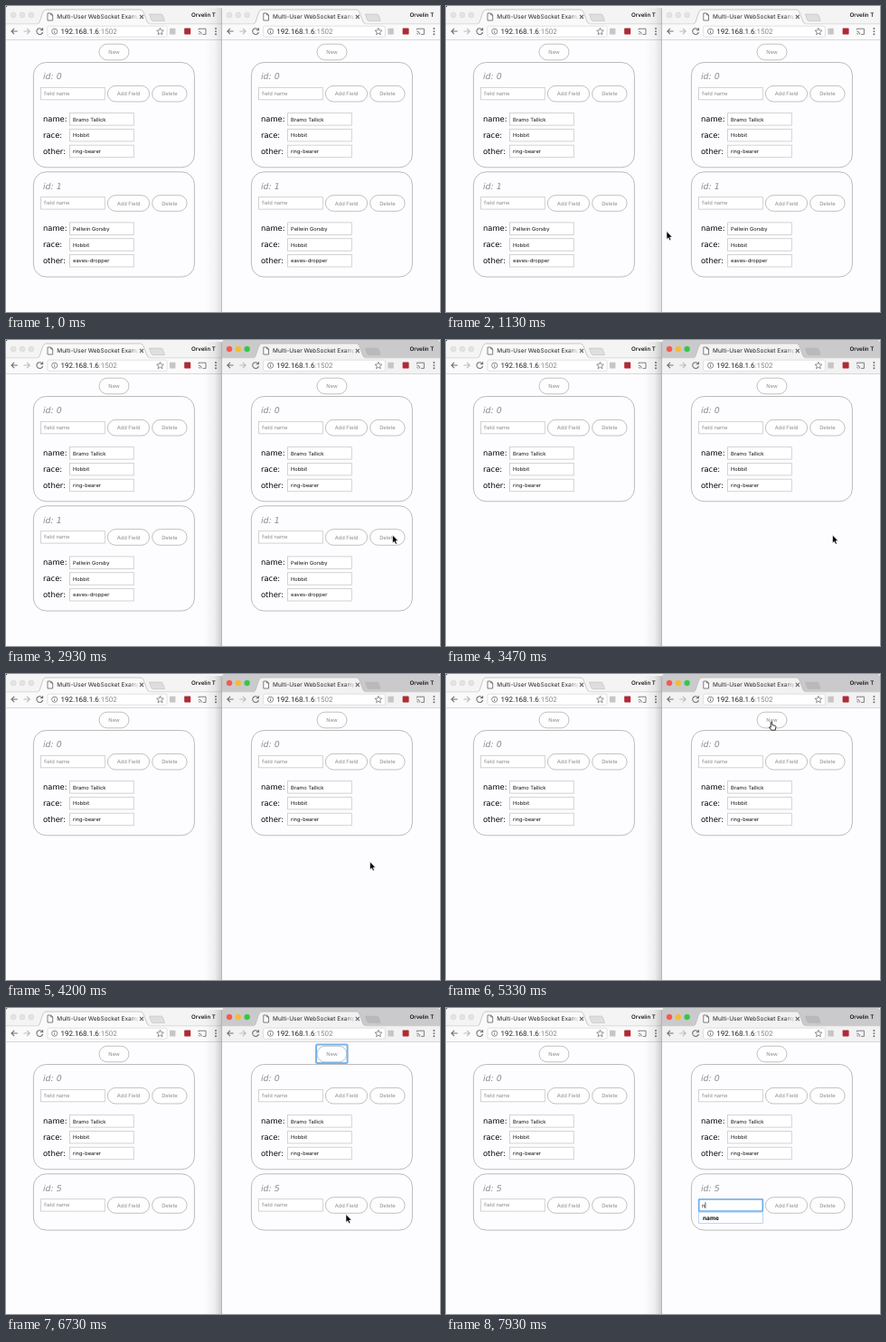
Recreate the animation shown at these times as an HTML page. Size 480 by 339 pixels, loop 8 s.

```html
<!DOCTYPE html>
<html lang="en">
<head>
<meta charset="utf-8">
<title>Shared records</title>
<style>
  html, body { margin: 0; width: 100%; height: 100%; overflow: hidden; background: #fdfcfe; }
  svg { display: block; width: 100vw; height: 100vh; }
  text { font-family: Inter, Roboto, sans-serif; font-size: 5.75px; white-space: pre; text-rendering: geometricPrecision; }
  .verdana { font-family: "DejaVu Sans", sans-serif; font-size: 8.4px; fill: #000; }
  .id { font-size: 9.4px; font-style: italic; fill: #8c8c8c; }
  .url { font-family: Roboto, Inter, sans-serif; font-size: 8px; fill: #222; }
  .dim { fill: #8c8c8c; }
  .button { fill: #fefefe; stroke: #acacac; stroke-width: .75; }
  .input { fill: #fff; stroke: #cecece; stroke-width: .9; }
  .card { fill: none; stroke: #a6a6a6; stroke-width: .75; }
  .icon { fill: none; stroke: #707070; stroke-width: 1.1; }
  .ring { fill: none; stroke: #78b4ea; stroke-width: 2; }
</style>
</head>
<body>
<svg id="stage" viewBox="0 0 480 339" preserveAspectRatio="none"></svg>
<script>
const LOOP = 8000, FPS = 15, CARD_STEP = 121.3;
const stage = document.getElementById('stage');

const rect = (x, y, w, h, rx, attrs) =>
  `<rect x="${x}" y="${y}" width="${w}" height="${h}" rx="${rx}" ${attrs}/>`;
const text = (x, y, str, attrs = '') => `<text x="${x}" y="${y}" ${attrs}>${str}</text>`;
const path = (d, attrs) => `<path d="${d}" ${attrs}/>`;
const circle = (x, y, r, attrs) => `<circle cx="${x}" cy="${y}" r="${r}" ${attrs}/>`;
const shift = (x, y, body, attrs = '') => `<g transform="translate(${x} ${y})" ${attrs}>${body}</g>`;
const button = (x, y, w, label) =>
  rect(x, y, w, 17.6, 8.8, 'class="button"') +
  text(x + w / 2, y + 11, label, 'class="dim" text-anchor="middle"');

function star(cx, cy, r) {
  const pts = Array.from({ length: 10 }, (_, i) => {
    const a = i * Math.PI / 5, q = i % 2 ? r * .45 : r;
    return (cx + q * Math.sin(a)).toFixed(2) + ',' + (cy - q * Math.cos(a)).toFixed(2);
  });
  return `<polygon points="${pts.join(' ')}" fill="none" stroke="#777" stroke-width=".8"/>`;
}

function card(key, slot, id, values) {
  const labels = ['name:', 'race:', 'other:'];
  const rows = values.map((v, i) => {
    const y = 118.6 + i * 17.8;
    return text(41, y + 9.4, labels[i], 'class="verdana"') +
      rect(70.5, y, 70.8, 13.5, 0, 'class="input"') +
      text(74, y + 9, v, 'fill="#111"');
  }).join('');
  return shift(0, slot * CARD_STEP,
    rect(30.4, 62.5, 178, values.length ? 116.3 : 62.3, 14, 'class="card"') +
    text(41, 81.3, 'id: ' + id, 'class="verdana id"') +
    rect(38.5, 90.4, 70.8, 13.4, 0, 'class="input"') +
    text(42, 99.2, 'field name', 'class="dim"') +
    button(112.4, 88.4, 46.2, 'Add Field') +
    button(161.7, 88.4, 38.4, 'Delete') + rows, `data-key="${key}"`);
}

// Window frame; extra widens the address bar and moves what follows it
function chrome(extra) {
  const w = 238.6 + extra;
  return rect(0, 0, w, 24, 3, 'class="bar"') +
    path('M35 20C39 19 39 4.5 44 4H149C154 4.5 154 19 159 20', 'class="tab" stroke="#b4b4b4" stroke-width=".7"') +
    rect(0, 19.8, w, 17.7, 0, 'class="tool"') +
    path(`M0 19.8H35M159 19.8H${w}`, 'stroke="#c4c4c4" stroke-width=".6"') +
    path(`M0 37.5H${w}`, 'stroke="#cacaca" stroke-width=".7"') +
    [8.2, 18, 27.8].map(x => circle(x, 10, 3, 'class="light" stroke-width=".5"')).join('') +
    path('M46 8H49.7L51.7 10V16H46ZM49.7 8V10H51.7', 'fill="#fff" stroke="#555" stroke-width=".75"') +
    text(56.3, 14, 'Multi-User WebSocket Exampl', 'style="font-size:6.5px" fill="url(#fade)"') +
    path('M148 10L152 14M152 10L148 14', 'class="icon"') +
    path('M158.5 9H171.5Q173 9 173.5 10.5L175.5 16.5H163Q161.2 16.5 160.6 15Z', 'class="plus" stroke="#b4b4b4" stroke-width=".5"') +
    path('M12.8 28H6M9.2 24.8L6 28L9.2 31.2', 'class="icon"') +
    path('M19.5 28H26.3M23.1 24.8L26.3 28L23.1 31.2', 'class="icon" style="stroke:#bbb"') +
    path('M40 26A3.4 3.4 0 1 0 40.6 29M40.6 24.2V26.8H38', 'class="icon"') +
    rect(46, 22.2, 132 + extra, 12, 1.5, 'fill="#fff" stroke="#d4d4d4" stroke-width=".7"') +
    circle(53.7, 28.2, 3.1, 'class="icon" style="stroke-width:.8"') +
    path('M53.7 27.7V30M53.7 26.2V26.9', 'class="icon" style="stroke-width:.9"') +
    text(60.5, 31, '192.168.1.6<tspan fill="#888">:1502</tspan>', 'class="url"') +
    shift(extra, 0,
      text(205, 12.3, 'Orvelin T', 'style="font-size:6.2px;font-weight:500" fill="#000"') +
      star(170.5, 28.4, 4.1) +
      rect(181, 24.8, 6.4, 6.6, .5, 'fill="#c6c6c6"') +
      rect(197.2, 24.6, 7, 7, .8, 'fill="#b02a35"') +
      path('M213 26.5V25.2H221V31.4H217.8M213 28.2A3.3 3.3 0 0 1 216.3 31.5M213 30.4A1.2 1.2 0 0 1 214.2 31.6', 'class="icon" style="stroke-width:.9"') +
      [25, 28.1, 31.2].map(y => circle(232, y, .95, 'fill="#666"')).join(''));
}

function browser(id, x, pageX, extra) {
  return `<g id="${id}">` + rect(x, 24, 242, 315, 0, 'fill="#fdfcfe"') +
    shift(x, 0, chrome(extra)) +
    shift(pageX, 0, button(103, 42.2, 33, 'New') +
      card('first', 0, 0, ['Bramo Tallick', 'Hobbit', 'ring-bearer']) +
      card('second', 1, 1, ['Pellwin Gorsby', 'Hobbit', 'eaves-dropper']) +
      card('added', 1, 5, [])) + '</g>';
}

const shade = (id, a) => `<linearGradient id="${id}"><stop offset="0" stop-opacity="0"/>
  <stop offset=".6" stop-opacity="${a * .3}"/><stop offset="1" stop-opacity="${a}"/></linearGradient>`;

stage.innerHTML = `<defs>
  <linearGradient id="fade" gradientUnits="userSpaceOnUse" x1="136" x2="147" y1="0" y2="0">
    <stop offset="0" stop-color="#222"/><stop offset="1" stop-color="#222" stop-opacity="0"/></linearGradient>
  ${shade('soft', .12)}${shade('deep', .2)}</defs>` +
  browser('left', 0, 0, 0) + path('M0 0H1.6L0 1.6Z', 'fill="#333"') +
  rect(219, 2, 20, 337, 0, 'id="shadow"') + browser('right', 238.8, 241, 2.6) +
  path('M238.5 3V339', 'stroke="#aaa" stroke-width=".7"') +
  rect(343, 40.6, 34.6, 20.4, 1.5, 'id="newRing" class="ring"') +
  rect(402.2, 208.4, 39.4, 20, 1.5, 'id="deleteRing" class="ring"') +
  '<g id="field">' +
    rect(279.7, 212, 70.6, 13, .5, 'class="ring" style="fill:#fff;stroke:#6caeeb;stroke-width:1.7"') +
    text(283, 220.5, 'field name', 'id="hint" class="dim"') +
    text(283, 220.5, 'n', 'id="typed" fill="#111"') +
    path('M0 215.3V222', 'id="caret" stroke="#111" stroke-width=".7"') +
    '<g id="list">' + rect(279.4, 226.2, 71.2, 12.4, 0, 'fill="#fff" stroke="#a9cff0" stroke-width=".8"') +
    text(284, 234.8, 'name', 'style="font-size:6.6px;font-weight:700" fill="#111"') + '</g></g>' +
  '<g id="cursor">' +
    path('M-.5 -.4V8.4L1.5 6.7L2.9 9.8L4.4 9.1L3.1 6.1H5.8Z', 'id="arrow" fill="#000" stroke="#fff" stroke-width=".6"') +
    path('M-.8 .3Q0 -.7 .8 .3V3.3L4.2 4.2Q5 4.5 4.9 5.5L4.2 9H-.2L-2.6 5.8Q-2.2 4.8 -.8 6Z', 'id="hand" fill="#fff" stroke="#222" stroke-width=".9"') +
    path('M-1.8 -4.6Q0 -4.6 0 -3.4Q0 -4.6 1.8 -4.6M0 -3.4V3.4M-1.8 4.6Q0 4.6 0 3.4Q0 4.6 1.8 4.6', 'id="beam" fill="none" stroke="#222" stroke-width=".8"') +
  '</g>';

const $ = id => document.getElementById(id);
const show = (el, on) => { el.style.display = on ? '' : 'none'; };
const each = (root, sel, fn) => root.querySelectorAll(sel).forEach(fn);

function paintBars(root, active) {
  const colors = { bar: active ? '#cacacc' : '#f4f4f5', tab: active ? '#f2f2f3' : '#fafafb',
    tool: active ? '#f2f2f3' : '#fafafb', plus: active ? '#b9b9bb' : '#dedede' };
  for (const name in colors) each(root, '.' + name, el => el.setAttribute('fill', colors[name]));
  const lights = active ? ['#f9564f', '#f6bb34', '#36c648'] : Array(3).fill('#e3e3e3');
  each(root, '.light', (el, i) => {
    el.setAttribute('fill', lights[i]);
    el.setAttribute('stroke', active ? lights[i] : '#d2d2d2');
  });
}

// Pointer stops: time, x, y
const stops = [
  [700, 264, 343], [1130, 244.5, 250], [1530, 252, 254], [1870, 350, 243], [2200, 428, 216.5],
  [3900, 428, 216.5], [4200, 403, 208.3], [4460, 374, 130], [4730, 357.5, 58], [5130, 360, 53.2],
  [6170, 360, 53.2], [6450, 374, 140], [6730, 376.5, 229], [7000, 331, 220.3], [7130, 329, 220]
];

// Smooth curve through the stops, at rest wherever the pointer waits
function pointer(t) {
  const last = stops.length - 1;
  if (t >= stops[last][0]) return stops[last].slice(1);
  const i = Math.max(0, stops.findIndex(s => s[0] > t) - 1);
  const a = stops[i], b = stops[i + 1], dt = b[0] - a[0], u = (t - a[0]) / dt;
  const slope = (j, k) => {
    const p = stops[j - 1], c = stops[j], n = stops[j + 1];
    if (!p || !n || (c[k] - p[k]) * (n[k] - c[k]) <= 0) return 0;
    return (n[k] - p[k]) / (n[0] - p[0]);
  };
  const u2 = u * u, u3 = u2 * u;
  return [1, 2].map(k => (2 * u3 - 3 * u2 + 1) * a[k] + (3 * u2 - 2 * u3) * b[k] +
    dt * ((u3 - 2 * u2 + u) * slope(i, k) + (u3 - u2) * slope(i + 1, k)));
}

function render(ms) {
  const t = Math.floor(ms * FPS / 1000 + .1) * 1000 / FPS;
  const from = at => t >= at - 10;
  const active = from(2600), typed = from(7800);

  paintBars($('left'), false);
  paintBars($('right'), active);
  $('shadow').setAttribute('fill', active ? 'url(#deep)' : 'url(#soft)');

  each(stage, '[data-key=second]', el => show(el, !from(3400)));
  each(stage, '[data-key=added]', el => show(el, from(5730)));
  show($('deleteRing'), from(3330) && !from(3400));
  show($('newRing'), from(5670) && !from(7330));

  show($('field'), from(7330));
  show($('hint'), !typed);
  show($('typed'), typed);
  show($('list'), from(7870));
  $('caret').setAttribute('transform', `translate(${typed ? 286.9 : 283} 0)`);

  const [x, y] = pointer(t);
  const overNew = active && x > 344 && x < 377 && y > 42 && y < 60;
  const overField = from(6800) && x < 350.5 && y < 225;
  show($('cursor'), from(730) && !typed);
  $('cursor').setAttribute('transform', `translate(${x.toFixed(2)} ${y.toFixed(2)})`);
  show($('hand'), overNew);
  show($('beam'), overField);
  show($('arrow'), !overNew && !overField);
}

const start = performance.now();
function tick() {
  render((performance.now() - start) % LOOP);
  requestAnimationFrame(tick);
}
tick();
</script>
</body>
</html>
```
